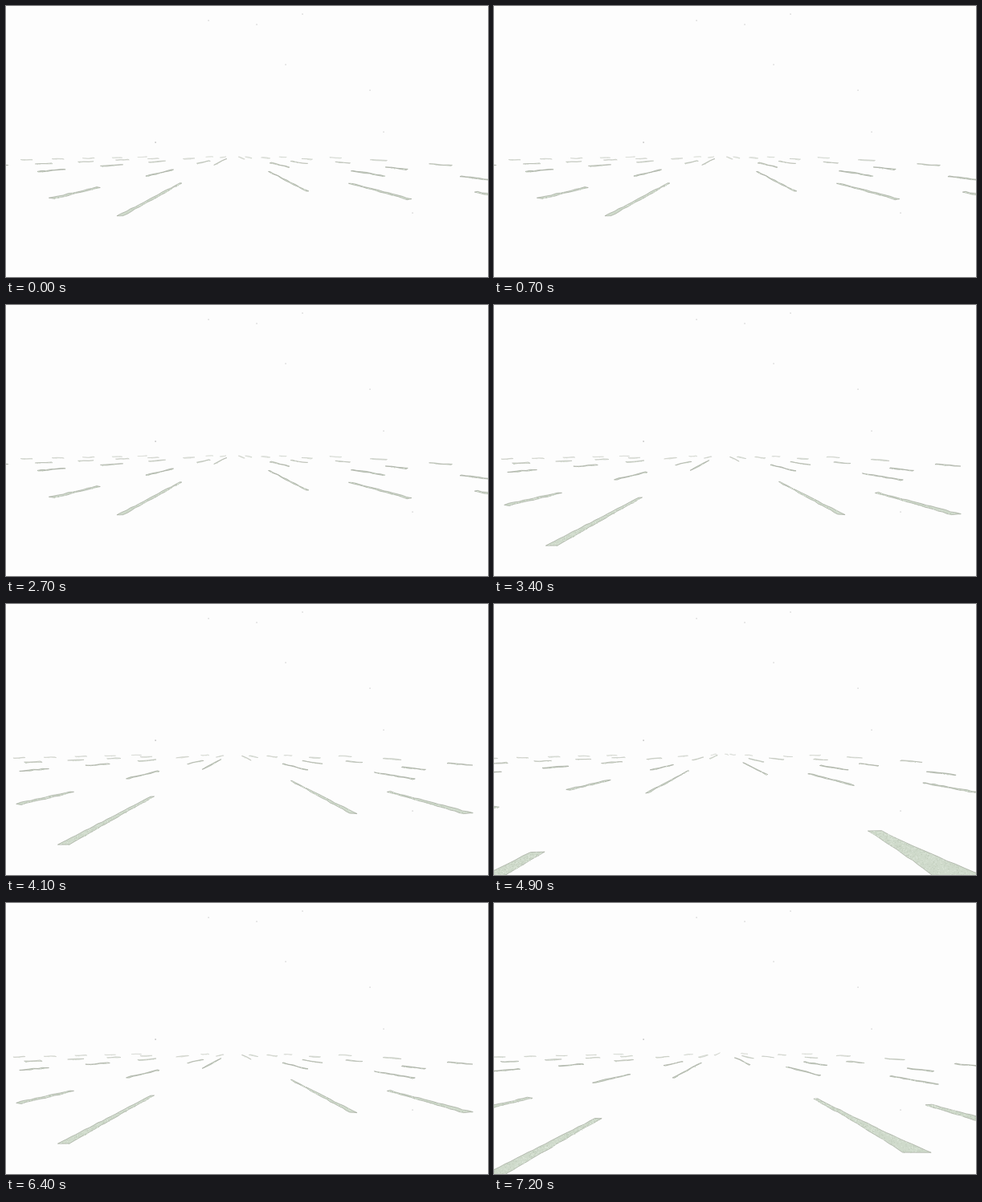
Write an HTML page with a canvas that moves like this. It is 600 px wide and 338 px high and loops after 7300 ms.

```html
<!DOCTYPE html>
<html>
<head>
<meta charset="utf-8">
<style>
html, body { margin: 0; height: 100%; overflow: hidden; background: #fdfdfd; }
canvas { display: block; }
</style>
</head>
<body>
<canvas id="stage" width="600" height="338"></canvas>
<script>
const ctx = document.getElementById('stage').getContext('2d');
const VX = 284, VY = 185; // vanishing point
const POSES = 4;          // after four steps each dash takes the place of the next

// A lane is the near end of one dash, as an offset from the vanishing point,
// and the rate at which that offset grows per step. Lanes run from the middle out.
const sides = [
  {
    lanes: [{ x: -142, y: 77, rate: .41 }, { x: -109, y: 27, rate: .2 }, { x: -166, y: 15, rate: .105 },
      { x: -247, y: 12, rate: .056 }, { x: -226, y: 6, rate: .043 }],
    taper: .02,
    bend: n => 1 - .03 * n,
    length: n => 1.8 - .1 * n,
    width: h => (h / 45) ** 2
  },
  {
    lanes: [{ x: 91, y: 46, rate: .49 }, { x: 218, y: 56, rate: .29 }, { x: 187, y: 27, rate: .18 },
      { x: 215, y: 19, rate: .1 }, { x: 271, y: 14, rate: .089 }],
    taper: 0,
    bend: n => 1.03 + .035 * n * n,
    length: n => 1.5 - .07 * n,
    width: h => (h / 50) ** 3
  }
];

let seed = 1;
const random = () => (seed = seed * 16807 % 2147483647) / 2147483647;
const jitter = size => (random() - .5) * size;
const clamp = (v, lo, hi) => Math.max(lo, Math.min(hi, v));

function pointAt(side, n, step) {
  const { x, y, rate } = side.lanes[n];
  const scale = Math.exp(rate * step * (1 - side.taper * step));
  return [VX + x * scale, VY + y * scale ** side.bend(n)];
}

function drawDash([x0, y0], [x1, y1], widthAt) {
  const height = y0 - VY;
  if (height < 3 || y1 > 345 || Math.max(x0, x1) < 0 || Math.min(x0, x1) > 595) return;
  const dx = x1 - x0, dy = y1 - y0, length = Math.hypot(dx, dy);
  const width = y => Math.min(40, .6 + widthAt(y - VY));
  // the ends are cut level with the horizon, less so on flat dashes
  const skew = clamp(-dx / dy, -2.5, 2.5);
  const cutX = (skew * dx - dy) / length, cutY = (skew * dy + dx) / length;
  // point at t along the dash, side -1..1 across it
  const at = (t, side) => {
    const y = y0 + dy * t, half = width(y) / 2 * side;
    return [x0 + dx * t + cutX * half, y + cutY * half];
  };
  const parts = clamp(Math.round(length / 6), 2, 24);
  ctx.beginPath();
  for (const side of [-1, 1])
    for (let i = 0; i <= parts; i++) {
      const [x, y] = at(side < 0 ? i / parts : 1 - i / parts, side);
      ctx.lineTo(x + jitter(.9), y + jitter(.9));
    }
  ctx.closePath();
  ctx.globalAlpha = clamp(.15 + height / 22, 0, 1);
  ctx.fillStyle = '#cfdacb';
  ctx.fill();
  ctx.lineWidth = .7;
  ctx.strokeStyle = '#a3a89c';
  ctx.stroke();
  // pencil grain
  const grains = Math.min(900, length * width((y0 + y1) / 2) / 4);
  for (let i = 0; i < grains; i++) {
    const [x, y] = at(random(), jitter(1.9));
    ctx.fillStyle = i % 2 ? '#bfcbba' : '#dfe8dc';
    ctx.fillRect(x, y, 1, 1);
  }
  ctx.globalAlpha = 1;
}

function speck(x, y, color) {
  ctx.fillStyle = color;
  ctx.fillRect(x - .5, y - .5, 1.2, 1.2);
}

function draw(pose) {
  ctx.fillStyle = '#fdfdfd';
  ctx.fillRect(0, 0, 600, 338);
  speck(186, 170, '#999');
  for (const [x, y] of [[348, 73], [369, 10], [252, 18], [312, 23], [453, 105], [470, 157], [506, 258]])
    speck(x, y, '#c4c4c4');

  seed = 97 + pose * 1301;
  for (const side of sides)
    side.lanes.forEach((lane, n) => {
      for (let step = pose - 3 * POSES; step <= 3 * POSES; step += POSES)
        drawDash(pointAt(side, n, step), pointAt(side, n, step - side.length(n)), side.width);
    });
}

// Twelve drawings a second, shown ten times a second
let shown = -1;
function tick() {
  const frame = Math.floor(performance.now() / 100) % 73;
  const pose = Math.round(frame * 1.2) % POSES;
  if (pose !== shown) draw(shown = pose);
  requestAnimationFrame(tick);
}
tick();
</script>
</body>
</html>
```
